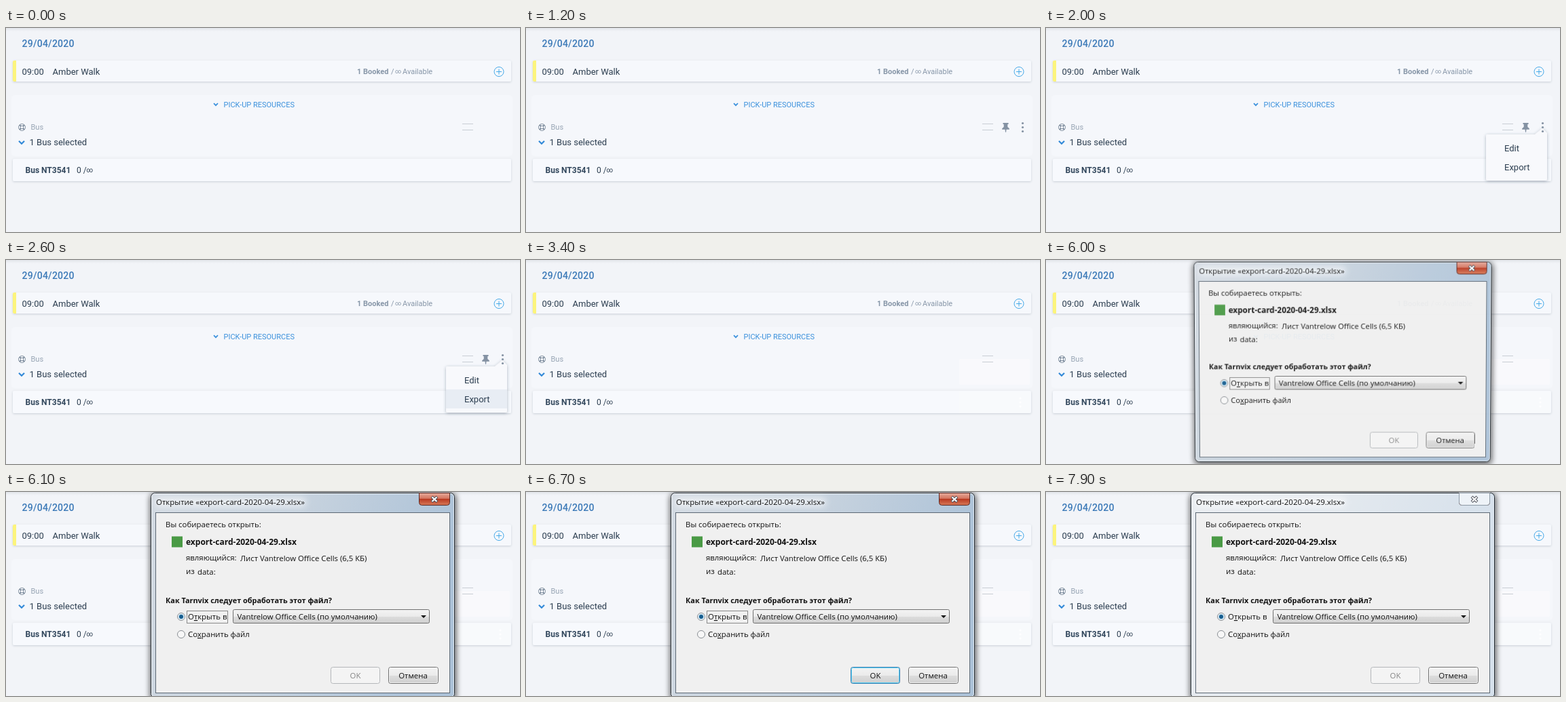
Write an HTML page that moves like this. It is 757 px wide and 301 px high and loops after 8100 ms.

```html
<!DOCTYPE html>
<html lang="en">
<head>
<meta charset="utf-8">
<title>Export to spreadsheet</title>
<style>
  html, body { margin: 0; width: 100%; height: 100%; overflow: hidden; background: #f2f4f8; }
  svg { position: absolute; left: 0; top: 0; width: 757px; height: 301px; overflow: visible; }
  text { white-space: pre; }
  .app { font: 13px Roboto, sans-serif; fill: #2c3e50; }
  .app .small { font-size: 11px; fill: #8796a8; }
  .app .blue { fill: #3a90dc; }
  .bold { font-weight: 700; }
  .win { font: 11.4px "Open Sans", "Noto Sans", sans-serif; fill: #111; }
  .mid { text-anchor: middle; }
  .line { fill: none; }

  /* One 8.1 s loop, every change is a hard cut */
  .cue { animation: 8.1s step-end infinite; visibility: hidden; }
  .tools { animation-name: tools; }
  .menu { animation-name: menu; }
  .hover { animation-name: hover; }
  .trace { animation-name: trace; }
  .trace-dots { animation-name: trace-dots; }
  .dialog { animation-name: dialog; transform-origin: 437px 152.5px; }
  .ready { animation-name: ready; }
  .idle { animation-name: idle; }
  .focus { animation-name: focus; }

  @keyframes tools { 0% { visibility: hidden } 14.815% { visibility: visible } 38.272%, 100% { visibility: hidden } }
  @keyframes menu { 0% { visibility: hidden } 24.691% { visibility: visible } 38.272%, 100% { visibility: hidden } }
  @keyframes hover {
    0% { visibility: hidden; opacity: .5 }
    30.864% { visibility: visible; opacity: .5 }
    32.099% { visibility: visible; opacity: 1 }
    38.272%, 100% { visibility: hidden; opacity: 1 }
  }
  @keyframes trace { 0% { visibility: hidden } 38.272%, 100% { visibility: visible } }
  @keyframes trace-dots { 0% { visibility: hidden } 41.975%, 100% { visibility: visible } }
  /* The window swings in, its lower edge tilted away */
  @keyframes dialog {
    0% { visibility: hidden; opacity: 0 }
    72.84% { visibility: visible; opacity: .74; transform: translateY(-3px) perspective(1200px) rotateX(-5.5deg) scale(.955) }
    74.074% { visibility: visible; opacity: .95; transform: translateY(-1.5px) perspective(1200px) rotateX(-2deg) scale(.976) }
    75.309%, 100% { visibility: visible; opacity: 1; transform: none }
  }
  @keyframes ready { 0% { visibility: hidden } 82.716% { visibility: visible } 97.531%, 100% { visibility: hidden } }
  @keyframes idle { 0% { visibility: hidden } 97.531%, 100% { visibility: visible } }
  @keyframes focus { 0% { visibility: hidden } 72.84% { visibility: visible } 97.531%, 100% { visibility: hidden } }
</style>
</head>
<body>
<svg viewBox="0 0 757 301" class="app">
  <defs>
    <linearGradient id="top" x2="0" y2="1">
      <stop stop-color="#e2e5ea"/><stop offset="1" stop-color="#f2f4f8"/>
    </linearGradient>
    <filter id="soft" x="-10%" y="-30%" width="120%" height="170%">
      <feDropShadow dx="0" dy="1" stdDeviation="1.5" flood-color="#44566c" flood-opacity=".24"/>
    </filter>
    <filter id="lift" x="-20%" y="-20%" width="140%" height="150%">
      <feDropShadow dx="0" dy="1" stdDeviation="2.2" flood-color="#33445a" flood-opacity=".38"/>
    </filter>
    <g id="dots">
      <circle cy="-6" r="1.6"/><circle r="1.6"/><circle cy="6" r="1.6"/>
    </g>
  </defs>

  <rect width="757" height="301" fill="#f2f4f8"/>
  <rect width="757" height="5" fill="url(#top)"/>
  <text x="23.5" y="28" font-weight="500" font-size="14" letter-spacing=".25" fill="#3c7ab8">29/04/2020</text>

  <rect x="10" y="48" width="734" height="31" rx="2" fill="#f6f8fc" filter="url(#soft)"/>
  <path d="M15 48h-3q-2 0-2 2v27q0 2 2 2h3z" fill="#fcf47c"/>
  <text x="23.5" y="69">09:00</text>
  <text x="68.5" y="69">Amber Walk</text>
  <g class="small">
    <text x="517" y="68" class="bold">1 Booked</text>
    <text x="567" y="68">/</text>
    <text x="573" y="67" font-size="9">∞</text>
    <text x="584" y="68">Available</text>
  </g>
  <g class="line" stroke="#45a9e8">
    <circle cx="726" cy="64.5" r="7"/>
    <path d="M722 64.5h8M726 60.5v8"/>
  </g>

  <rect x="8" y="99" width="738" height="90" rx="5" fill="#f5f7fb"/>
  <path d="M306 111.2l3 3 3-3" class="line" stroke="#3a90dc" stroke-width="1.7"/>
  <text x="320.5" y="117" class="blue" font-size="11">PICK-UP RESOURCES</text>

  <g class="line" stroke="#7c8b9c">
    <circle cx="23.5" cy="146.5" r="5"/>
    <circle cx="23.5" cy="146.5" r="2.3"/>
    <path d="M20 143l2 2m3 3l2 2m0-7l-2 2m-3 3l-2 2" stroke-width="1.8"/>
  </g>
  <text x="36.5" y="150" class="small" fill-opacity=".85">Bus</text>
  <path d="M19 166.8l4 4 4-4" class="line" stroke="#3289d8" stroke-width="2.2"/>
  <text x="34.5" y="173">1 Bus selected</text>

  <rect x="10" y="193" width="734" height="33" rx="2" fill="#f7f9fd" filter="url(#soft)"/>
  <g font-size="12">
    <text x="28.5" y="214" class="bold" fill="#34495e">Bus NT3541</text>
    <text x="104" y="214">0 /</text>
    <text x="118.5" y="212.5" font-size="10">∞</text>
  </g>

  <g class="cue trace" fill="#fafbfd">
    <rect x="638" y="146" width="104" height="38" rx="3" opacity=".8"/>
    <rect x="638" y="194" width="104" height="32" opacity=".7"/>
  </g>
  <use href="#dots" x="728" y="210" class="cue trace-dots" fill="#fff"/>
  <path d="M672 141.5h16M672 150.5h16" stroke="#c8cdd4"/>

  <g class="cue menu">
    <path d="M650 157h70l11-9 7 7v68q0 2-2 2h-86q-2 0-2-2v-64q0-2 2-2z" fill="#f8f9fc" filter="url(#lift)"/>
    <rect x="648" y="191" width="90" height="28" fill="#e8edf4" class="cue hover"/>
    <text x="675" y="182">Edit</text>
    <text x="675" y="210">Export</text>
  </g>
  <g class="cue tools" fill="#8492a3">
    <path d="M702.5 140h8v2h-1.2v4l2.5 2.2v1.6h-4.3l-.5 4h-1l-.5-4h-4.3v-1.6l2.5-2.2v-4h-1.2z"/>
    <use href="#dots" x="731.5" y="146.5"/>
  </g>
</svg>

<svg viewBox="0 0 757 301" class="cue dialog win">
  <defs>
    <linearGradient id="glass" x2="1" y2=".25">
      <stop stop-color="#d3dae2"/><stop offset=".5" stop-color="#c6d2de"/><stop offset="1" stop-color="#acc2d8"/>
    </linearGradient>
    <linearGradient id="red" x2="0" y2="1">
      <stop stop-color="#e6ab9c"/><stop offset=".48" stop-color="#d2705a"/>
      <stop offset=".5" stop-color="#b93a22"/><stop offset="1" stop-color="#d87a58"/>
    </linearGradient>
    <linearGradient id="button" x2="0" y2="1">
      <stop stop-color="#f3f3f3"/><stop offset=".5" stop-color="#ebebeb"/>
      <stop offset=".51" stop-color="#dddddd"/><stop offset="1" stop-color="#cfcfcf"/>
    </linearGradient>
    <filter id="blur"><feGaussianBlur stdDeviation="4.5"/></filter>
    <filter id="glow" x="-20%" y="-100%" width="140%" height="300%"><feGaussianBlur stdDeviation="5"/></filter>
    <path id="close" d="M608.5 1.5h45v14q0 4-4 4h-37q-4 0-4-4z"/>
  </defs>

  <rect x="212" y="2" width="451" height="306" rx="7" opacity=".65" filter="url(#blur)"/>
  <rect x="213.5" y="1.5" width="447" height="302" rx="6" fill="url(#glass)" stroke="#1f2830"/>
  <rect x="214.5" y="2.5" width="445" height="300" rx="5" class="line" stroke="#fff" stroke-opacity=".7"/>
  <rect x="215" y="3" width="444" height="299" rx="5" fill="#fff" opacity=".5" class="cue idle"/>
  <rect x="220" y="8" width="222" height="14" rx="6" fill="#fff" opacity=".6" filter="url(#glow)"/>
  <rect x="220.5" y="30.5" width="433" height="266" fill="#f0f0f0" stroke="#5c6874"/>
  <text x="221" y="19" font-size="11.5">Открытие «export-card-2020-04-29.xlsx»</text>

  <use href="#close" fill="url(#red)" stroke="#5a2a26"/>
  <use href="#close" fill="#eef3f8" stroke="#8e9aa6" class="cue idle"/>
  <g class="line">
    <path d="M627 7l8 7.5m0-7.5l-8 7.5" stroke="#4b4f58" stroke-width="4"/>
    <path d="M627.5 7.5l7 6.500m0-6.500l-7 6.500" stroke="#fff" stroke-width="2.2"/>
  </g>

  <text x="235" y="52">Вы собираетесь открыть:</text>
  <rect x="244" y="65.500" width="16" height="16" fill="#4a9a45"/>
  <text x="265" y="78" class="bold" font-size="12">export-card-2020-04-29.xlsx</text>
  <text x="265" y="101">являющийся:</text>
  <text x="345" y="102">Лист Vantrelow Office Cells (6,5 КБ)</text>
  <text x="265" y="121">из</text>
  <text x="282" y="122">data:</text>
  <text x="235" y="163.5" class="bold" font-size="10.9">Как Tarnvix следует обработать этот файл?</text>

  <g fill="#f7f7f7" stroke="#8a8f94">
    <circle cx="258" cy="184" r="5.5"/>
    <circle cx="258" cy="210" r="5.5"/>
  </g>
  <circle cx="258" cy="184" r="4.2" fill="#b9dcef"/>
  <circle cx="258" cy="184" r="3" fill="#175d8e"/>
  <text x="268" y="188">О<tspan text-decoration="underline">т</tspan>крыть в</text>
  <rect x="266.5" y="175.5" width="60" height="18" class="line cue focus" stroke="#222" stroke-dasharray="1 1"/>
  <text x="268" y="214">Со<tspan text-decoration="underline">х</tspan>ранить файл</text>

  <rect x="334.5" y="173.5" width="289" height="20" rx="2" fill="url(#button)" stroke="#707070"/>
  <text x="340.5" y="188">Vantrelow Office Cells (по умолчанию)</text>
  <path d="M611 182h8l-4 4z"/>

  <rect x="478.5" y="258.5" width="72" height="24" rx="3" fill="#f4f4f4" stroke="#b4b7ba"/>
  <text x="514.5" y="275" class="mid" fill="#858585">OK</text>
  <g class="cue ready">
    <rect x="478.5" y="258.5" width="72" height="24" rx="3" fill="url(#button)" stroke="#3c7fb1"/>
    <rect x="479.5" y="259.5" width="70" height="22" rx="2" class="line" stroke="#55cdf2"/>
    <text x="514.5" y="275" class="mid">OK</text>
  </g>
  <rect x="563.5" y="258.5" width="73" height="24" rx="3" fill="url(#button)" stroke="#707070"/>
  <rect x="564.5" y="259.5" width="71" height="22" rx="2" class="line" stroke="#fff" stroke-opacity=".7"/>
  <text x="599.5" y="275" class="mid">Отмена</text>
</svg>
</body>
</html>
```
